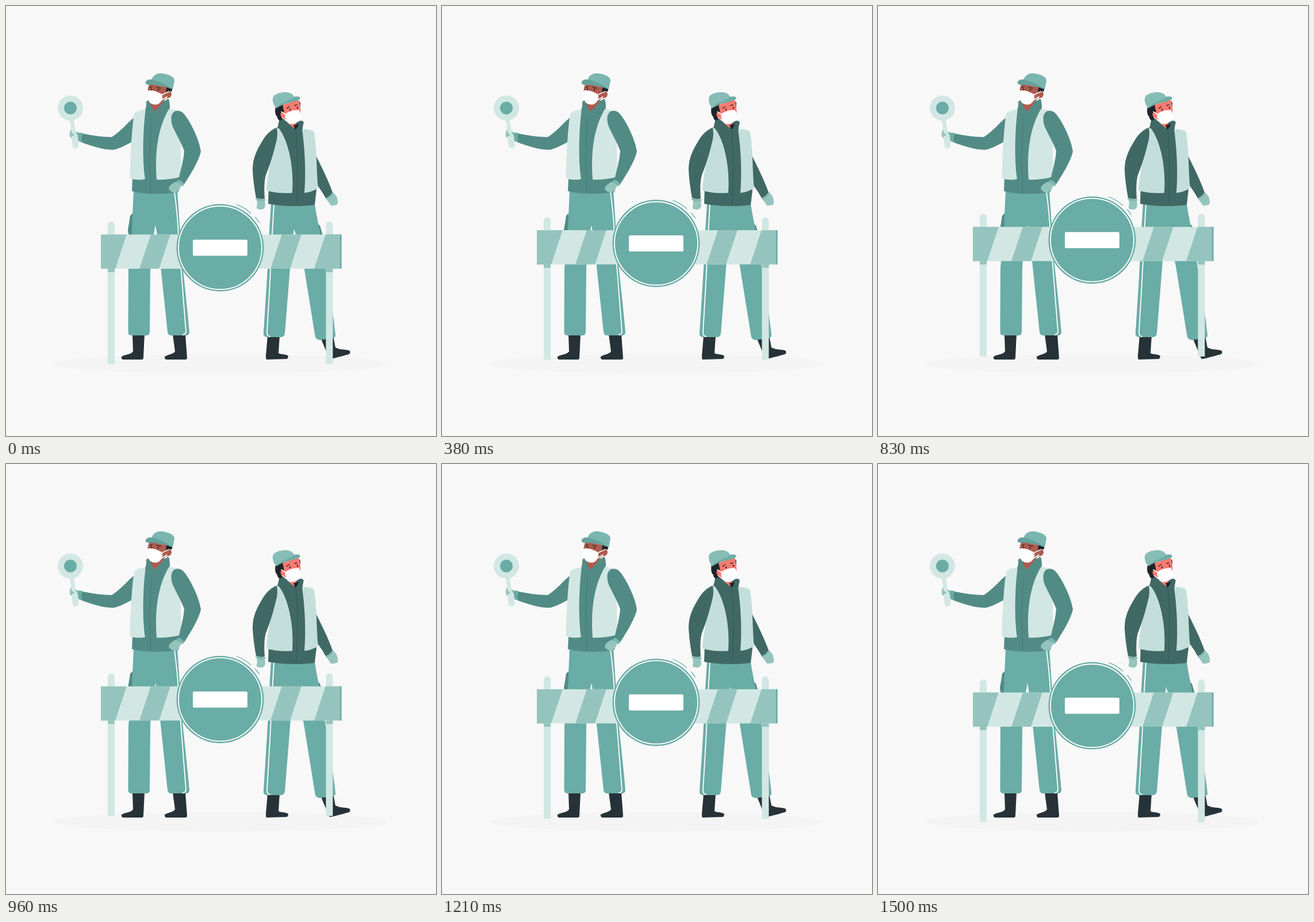
These frames come from a looping animation (748 by 748 pixels, 1540 ms). An HTML page with a canvas:

```html
<!DOCTYPE html>
<html lang="en">
<head>
<meta charset="utf-8">
<title>Road block</title>
<style>
html, body { margin: 0; width: 100%; height: 100%; overflow: hidden; background: #f8f8f8; }
canvas { display: block; width: 748px; height: 748px; }
</style>
</head>
<body>
<canvas id="stage" width="748" height="748"></canvas>
<script>
const ctx = document.getElementById('stage').getContext('2d');

const TEAL = '#6aaca6', MID = '#95c4be', PALE = '#d2e7e3', WHITE = '#fff';
const JACKET_A = '#528b85', JACKET_B = '#406864', VEST_B = '#c4dfdb';
const BOOT = '#263238', HAIR = '#20242a', SKIN_A = '#ae5b4e', SKIN_B = '#fa7a70';

const LOOP = 1540, STEPS = 36, STEP = 1500 / STEPS, LIFT = 15;

function fill(color, d) {
  ctx.fillStyle = color;
  ctx.fill(new Path2D(d));
}

function line(color, width, d) {
  ctx.strokeStyle = color;
  ctx.lineWidth = width;
  ctx.lineCap = 'round';
  ctx.stroke(new Path2D(d));
}

function oval(color, x, y, rx, ry = rx) {
  ctx.fillStyle = color;
  ctx.beginPath();
  ctx.ellipse(x, y, rx, ry, 0, 0, Math.PI * 2);
  ctx.fill();
}

function arc(color, width, r, from, to) {
  ctx.strokeStyle = color;
  ctx.lineWidth = width;
  ctx.beginPath();
  ctx.arc(372.5, 420.5, r, from * Math.PI / 180, to * Math.PI / 180);
  ctx.stroke();
}

function box(color, x, y, w, h, radius = 0) {
  ctx.fillStyle = color;
  ctx.beginPath();
  ctx.roundRect(x, y, w, h, radius);
  ctx.fill();
}

function leftGuard() {
  // boots and trousers
  fill(BOOT, 'M220 571L241 571L239 612Q239 615 236 615L203 615Q200 613 201 610C206 606 216 607 221 601Z');
  fill(BOOT, 'M290 571L312 571L315 612Q315 615 312 615L278 615Q275 612 276 610C282 606 290 606 294 601Z');
  fill('#528b85', 'M220 361Q215 363 215 372L212 389Q212 396 215 400L222 400Z');
  fill(TEAL, 'M222 320L298 320C300 350 303 390 304 420C309 470 316 530 319 567Q319 573 313 573L287 573Q282 573 281 567L269 453Q264 400 260 381Q252 418 251 457L250 567Q250 573 244 573L218 573Q212 573 212.5 566L213 457C216 425 219 405 219 390Z');
  line(WHITE, 1.8, 'M293 323C296 345 299 375 300 400C304 455 309 510 313 566Q313 571 308 572');

  // raised arm and paddle
  fill(JACKET_A, 'M226 191C210 204 200 218 184 228C168 228 150 225 133 222Q128 229 131 237C150 244 172 251 188 250C198 248 208 242 220 236Z');
  fill(MID, 'M126 220L113 215Q110 218 111 227Q116 232 126 234Z');
  fill(TEAL, 'M134 221.500C127 219 124 220 123 225L123 232C126 236 130 237 133 237Q129 229 134 221.500Z');
  line(PALE, 7, 'M114 197L119 228');
  line(PALE, 11, 'M119.500 227L121 242');
  oval(PALE, 112, 177.500, 22);
  oval(TEAL, 112, 177.500, 11);
  fill(MID, 'M111 219L117 222Q120 224 117 226L111 227Z');

  // torso and vest
  fill(JACKET_A, 'M245 166L284 164L284 179L300 186L303 240L302 300C303 310 302 318 300 323C277 328 240 328 219 322L220 300L226 190L243 180Z');
  fill(PALE, 'M243 180C236 181 228 182 223 187C219 210 215 278 216 300Q230 304 242 301C237 270 238 215 243 180Z');
  fill(PALE, 'M284 178L299 183L304 240L305 297Q284 303 262 302C259 260 262 215 284 178Z');
  line('#477a75', 1, 'M254 190C250 225 249 270 252 324');

  // bent arm
  fill(MID, 'M298 305C288 308 281 315 284 320C290 326 298 326 302 318L306 310Z');
  fill(JACKET_A, 'M293 183.500C285 189 287 203 291 212C297 225 304 236 310 252C309 270 303 287 300 303L310 310C322 292 336 268 339 253C336 232 321 201 309 187C305 182 298 181 293 183.500Z');
  fill('#7ab5af', 'M300 302Q307 304 310 310L307 314Q302 308 296 307Z');

  // neck, face, collar
  fill(SKIN_A, 'M251 162L274 160L270 176L258 185L252 174Z');
  fill(SKIN_A, 'M250 135C246 142 246 150 247 158C250 171 262 173 270 168L279 160Q287 161 288 154Q288 148 282 149L284 142Z');
  fill(HAIR, 'M279 141L290 143L288 149Q283 147 280 150L278 154Z');
  line(HAIR, 1.3, 'M250 142L254 140M262 141L269 143');
  oval(HAIR, 253, 145, 1.1, 1.7);
  oval(HAIR, 265, 145.500, 1.1, 1.7);
  line(WHITE, 1.5, 'M270 155L283 149M270 164L280 158');
  fill(WHITE, 'M246 148C250 145 262 148 271 153.500C274 159 271 168 264 171C256 173 248 169 247 163C245 158 245 152 246 148Z');
  fill(JACKET_A, 'M248 164Q251 173 256 180L261 187L250 199L242 181Q245 175 244 166Z');
  fill(JACKET_A, 'M282 161Q285 164 285 178L263 198L257 187Q268 171 282 161Z');

  // cap
  fill('#7ab5af', 'M253 130C255 121 261 117 270 117C279 118 294 122 293 130L290 145C280 140 265 138 252 136Z');
  fill('#64a19b', 'M242.500 133C245 127 251 127 258 129Q277 135 290 145Q270 137 252 137Q243 138 242.500 133Z');
}

function rightGuard() {
  // boots and trousers
  fill(BOOT, 'M455 574L476 574L474 604C480 607 488 605 491 609Q491 614 487 614L453 615Q452 613 452 609Z');
  fill(BOOT, 'M548 579L569 573L573 594C582 599 594 597 598 600Q600 604 596 606C588 608 575 612 564 614Q562 614 560 608Z');
  fill('#528b85', 'M540 378Q547 381 547 385L551 399L541 404Z');
  fill(TEAL, 'M461 343L537 344C540 365 545 385 549 410C556 455 569 530 573 571Q574 577 568 578L547 581Q540 581 538 576L518 452Q509 409 501 388Q497 415 495 445L485 570Q484 576 478 576L454 576Q447 575 448 569L455 457Q457 400 461 343Z');
  line(WHITE, 1.8, 'M466 346L463 397C461 455 457 515 454 568Q454 574 459 575');

  // far arm and torso
  fill(MID, 'M556 334L569 325Q576 329 577 339L577 345Q570 348 565 347C562 342 559 339 556 334Z');
  fill(JACKET_B, 'M538 258C550 282 560 302 568 324Q564 331 556 334C550 323 544 315 540 309Z');
  line('#7ab5af', 2, 'M557 335Q565 332 569 325');
  fill(JACKET_B, 'M475 199L516 200L516 214L530 218L539 270L540 321L537 346C515 349 480 349 456 344L457 315L466 213L473 211Z');
  fill(VEST_B, 'M473 210.500L464 214C473 235 456 272 453 321Q475 327 498 325C501 285 493 235 473 210.500Z');
  fill(VEST_B, 'M515 214C525 214 532 215 536 219C541 250 540 290 543 317Q531 324 519 325C522 290 520 250 515 214Z');
  line('#355854', 1, 'M504 216C508 255 507 305 505 346');

  // near arm
  fill(MID, 'M436 335L450 336L451 348Q449 355 442 354L437 353Q435 350 437 346Z');
  fill(JACKET_B, 'M471 212C461 215 453 223 447 233C437 249 429 264 429 285C430 305 433 322 435 334Q443 337 450 335C449 318 449 305 452 294C460 275 467 250 471 232Q473 222 471 212Z');
  line('#7ab5af', 2, 'M435 336Q443 339 451 337');

  // neck, face, collar
  fill(SKIN_B, 'M481 188L504 200L505 213L496 211Z');
  fill(HAIR, 'M469 174L483 169L485 197C479 202 472 199 472 193C467 188 468 181 469 174Z');
  fill(HAIR, 'M507 163L512 168L512 178L509 175Z');
  fill(SKIN_B, 'M481 172L509 163C512 172 513 180 512 190C508 205 495 206 490 202L481 194C475 190 477 183 484 185Z');
  line(HAIR, 1.3, 'M488 178L493 175M502 173L506 172');
  oval(HAIR, 494, 180, 1.2, 1.8);
  oval(HAIR, 507, 177, 1.2, 1.8);
  line(WHITE, 1.5, 'M487 189L479 184M488 200L480 194');
  fill(WHITE, 'M486 188C492 183 503 180 510 181.500C513 187 514 195 510 200C503 206 494 207 490 203C486 199 485 193 486 188Z');
  fill(JACKET_B, 'M482 196Q490 204 499 211L503 217L500 221L472 212L476 200Z');
  fill(JACKET_B, 'M513 199L518 202L515 216L506 222L503 215Q510 208 513 199Z');
  fill(HAIR, 'M500 207Q506 207 509 204Q508 212 503 215Z');

  // cap
  fill('#87bdb7', 'M470 178C464 170 462 161 466 156C474 149 495 147 500 156L503 162C491 168 480 170 470 178Z');
  fill('#6eaca5', 'M469.500 178C478 166 493 166 501 158C508 156 512 158 512 161C506 167 491 168 483 171Z');
}

function post(x) {
  box(PALE, x, 375, 12, 248, [6, 6, 0, 0]);
  box(MID, x, 457, 12, 6);
}

function barrier() {
  post(177);
  post(556.5);

  // striped board
  ctx.save();
  ctx.beginPath();
  ctx.rect(165, 397.5, 418.5, 59.5);
  ctx.clip();
  box(PALE, 165, 397, 419, 61);
  for (let x = 176; x < 580; x += 76) {
    fill(MID, `M${x} 397H${x + 34}L${x + 14} 457.500H${x - 20}Z`);
  }
  box(MID, 165, 397, 14, 61);
  fill(MID, 'M560 397H584V458H540Z');
  box(TEAL, 581, 397, 3, 61);
  ctx.restore();

  // round sign
  oval(TEAL, 372.5, 420.5, 76);
  arc(WHITE, 1.8, 72.5, 0, 360);
  box(WHITE, 325, 406.5, 95, 28, 2.5);
  arc(TEAL, 1.3, 80.5, -68.5, -48.5);
  arc(TEAL, 1.3, 81, -41, -33);
}

function draw(t) {
  // motion advances at 24 steps a second, on a 10 ms grid
  const tick = Math.floor(t / 10) * 10 + 5;
  const step = Math.min(STEPS, Math.ceil(tick / STEP) - 1);
  const half = STEPS / 2;
  const rise = LIFT * (1 - Math.abs(step - half) / half);

  box('#f8f8f8', 0, 0, 748, 748);
  oval('#f4f4f4', 374, 622.5, 290, 17);
  leftGuard();
  rightGuard();
  ctx.save();
  ctx.translate(0, -rise);
  barrier();
  ctx.restore();
}

const start = performance.now();
function loop() {
  draw((performance.now() - start) % LOOP);
  requestAnimationFrame(loop);
}
loop();
</script>
</body>
</html>
```
